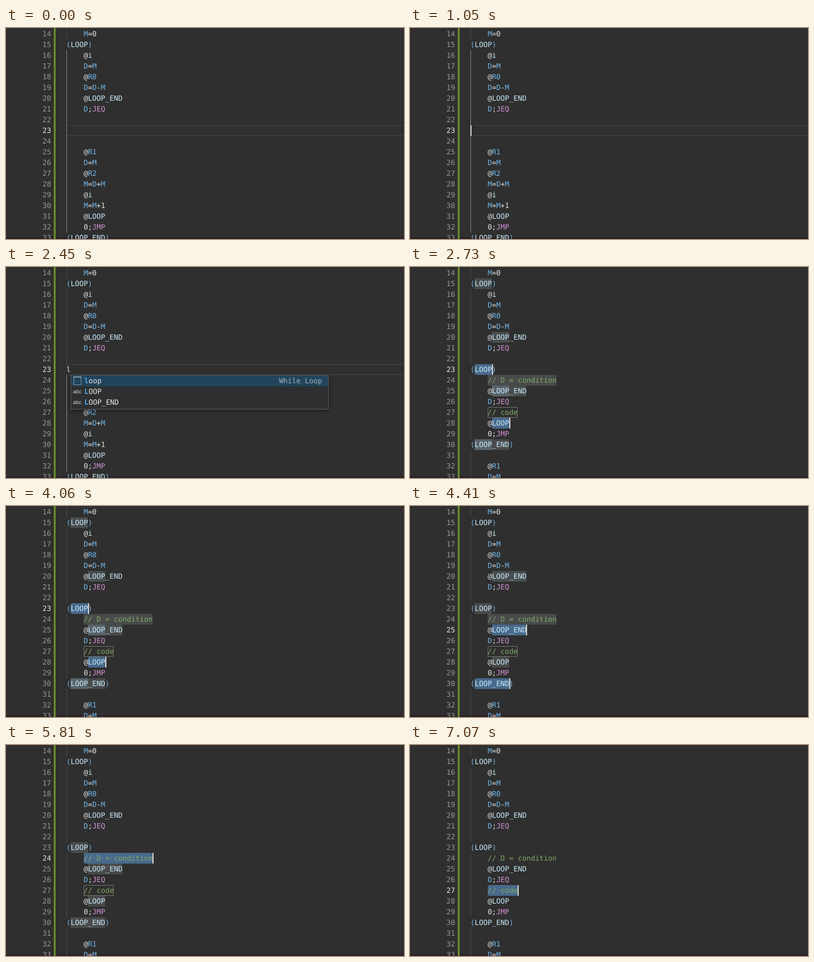
An HTML page that plays this animation: 666 by 354 pixels, repeating every 7.14 s.

```html
<!DOCTYPE html>
<html lang="en">
<head>
<meta charset="utf-8">
<title>Assembly loop snippet</title>
<style>
  html, body { margin: 0; width: 100%; height: 100%; overflow: hidden; background: #2f2f2f; }
  #stage {
    position: absolute; left: 0; top: 0; width: 666px; height: 354px; overflow: hidden;
    background: #2f2f2f; color: #e6e6e6;
    font: 12px/18px "DejaVu Sans Mono", "Liberation Mono", monospace;
    text-rendering: geometricPrecision; font-variant-ligatures: none;
  }
  #stage div { position: absolute; white-space: pre; box-sizing: border-box; }
  .foot { left: 0; top: 351px; width: 666px; height: 3px; background: #2b2128; }
  .bar { left: 80px; top: 0; width: 3px; height: 354px; background: #688f2b; }
  .num { left: 40px; width: 35.4px; text-align: right; color: #969696; }
  .num.now { color: #e8e8e8; }
  .row { left: 101px; width: 580px; height: 18px; border: 1px solid #434343; border-width: 1px 0; }
  .guide { left: 101px; width: 1px; background: #4a4a4a; }
  .guide.active { background: #858585; }
  .code { left: 101px; }
  .word { background: #484d4e; }
  .stop { background: #494b4b; }
  .hit { background: #59636b; }
  .sel { background: #486a8c; border-radius: 3px; }
  .end { border: 1px solid #6c706c; }
  .caret { width: 2px; height: 18px; background: #cfcfcf; }
  .reg { color: #70b8ec; }
  .label { color: #c9ebfb; }
  .jump { color: #d191d3; }
  .note { color: #7faa64; }
  .dot { color: #7d8d94; }
  .menu {
    left: 108px; top: 181px; width: 432px; height: 58px;
    background: #2e2f30; border: 1px solid #565656; box-shadow: 0 2px 8px rgba(0, 0, 0, .4);
  }
  .menu .pick { left: 0; top: 0; width: 430px; height: 18px; background: #21445c; }
  .menu .name { left: 22px; }
  .menu .name b { color: #4aa5e8; }
  .menu .hint { right: 10px; top: 0; color: #a3b0b8; }
  .menu .abc { left: 3px; color: #d0d0d0; font: 9px/18px "Liberation Sans", Arial, sans-serif; }
  .menu .icon { left: 4px; top: 2px; width: 13px; height: 14px; border: 1px dotted #d8d8d8; border-top-style: solid; }
</style>
</head>
<body>
<div id="stage"></div>
<script>
const LOOP_MS = 7140, BLINK = 490, FIRST = 14, ROW = 18, CHAR = 7.224, LEFT = 101;
const stage = document.getElementById("stage");

const head = ["    M=0", "(LOOP)", "    @i", "    D=M", "    @R0", "    D=D-M", "    @LOOP_END", "    D;JEQ", ""];
const tail = ["", "    @R1", "    D=M", "    @R2", "    M=D+M", "    @i", "    M=M+1", "    @LOOP", "    0;JMP", "(LOOP_END)"];
const snippet = ["(LOOP)", "    // D = condition", "    @LOOP_END", "    D;JEQ", "    // code", "    @LOOP", "    0;JMP", "(LOOP_END)"];

const typed = text => [...head, text, ...tail];
const expanded = [...head, ...snippet, ...tail.slice(0, 3)];

// Marks: [class, line, column, length]
const endBox = ["end", 27, 4, 7];
const stopNote = ["stop", 24, 4, 16];
const stopLoop = [["stop", 23, 1, 4], ["stop", 28, 5, 4]];
const stopEnd = [["stop", 25, 5, 8], ["stop", 30, 1, 8]];
const closedGuides = [[14, 14], [16, 22], [24, 29], [31, 33]];

const scenes = [
  { at: 0, caretFrom: 840, line: 23, row: true, code: typed(""), carets: [[23, 0]],
    guides: [[14, 14], [16, 32, true]], marks: [] },
  { at: 1960, line: 23, row: true, menuFrom: 2030, code: typed("l"), carets: [[23, 1]],
    guides: [[14, 14], [16, 22], [24, 32, true]], marks: [] },
  { at: 2660, line: 23, code: expanded, carets: [[23, 5], [28, 9]], guides: closedGuides,
    marks: [stopNote, ...stopEnd, endBox, ["word", 15, 1, 4], ["word", 20, 5, 4],
      ["hit", 25, 5, 4], ["hit", 30, 1, 4], ["sel", 23, 1, 4], ["sel", 28, 5, 4]] },
  { at: 4270, line: 25, code: expanded, carets: [[25, 13], [30, 9]], guides: closedGuides,
    marks: [stopNote, ...stopLoop, endBox, ["word", 20, 5, 8], ["sel", 25, 5, 8], ["sel", 30, 1, 8]] },
  { at: 5530, line: 24, code: expanded, carets: [[24, 20]], guides: closedGuides,
    marks: [...stopLoop, ...stopEnd, endBox, ["sel", 24, 4, 16]] },
  { at: 6090, line: 27, code: expanded, carets: [[27, 11]], guides: closedGuides,
    marks: [["sel", 27, 4, 7]] }
];

const rowY = line => 1 + (line - FIRST) * ROW;
const colX = col => LEFT + col * CHAR;
const box = (cls, style, body = "") => `<div class="${cls}" style="${style}">${body}</div>`;
const span = (cls, text) => `<span class="${cls}">${text}</span>`;

function paint(text, dotted) {
  return text.replace(/(\/\/.*)|(LOOP\w*|\bi\b)|(JEQ|JMP)|(\bR\d|[DM()])/g, (all, note, label, jump) => {
    if (note) return span("note", dotted ? all.replace(/ /g, span("dot", "·")) : all);
    return span(label ? "label" : jump ? "jump" : "reg", all);
  });
}

function menu() {
  const name = (word, i) => box("name", `top:${i * ROW}px`, `<b>${word[0]}</b>${word.slice(1)}`) +
    (i ? box("abc", `top:${i * ROW}px`, "abc") : "");
  return box("menu", "", box("pick", "") + box("icon", "") +
    ["loop", "LOOP", "LOOP_END"].map(name).join("") + box("hint", "", "While Loop"));
}

function draw(scene, caretOn, menuOn) {
  let html = box("foot", "") + box("bar", "");
  if (scene.row) html += box("row", `top:${rowY(scene.line)}px`);
  for (const [from, to, active] of scene.guides)
    html += box(active ? "guide active" : "guide", `top:${rowY(from)}px;height:${(to - from + 1) * ROW}px`);
  for (const [cls, line, col, len] of scene.marks)
    html += box(cls, `left:${colX(col)}px;top:${rowY(line)}px;width:${len * CHAR}px;height:${ROW}px`);
  scene.code.slice(0, 20).forEach((text, i) => {
    const line = FIRST + i, top = `top:${rowY(line)}px`;
    const dotted = scene.marks.some(m => m[0] === "sel" && m[1] === line);
    html += box(line === scene.line ? "num now" : "num", top, line) + box("code", top, paint(text, dotted));
  });
  if (menuOn) html += menu();
  if (caretOn) for (const [line, col] of scene.carets)
    html += box("caret", `left:${Math.floor(colX(col))}px;top:${rowY(line)}px`);
  stage.innerHTML = html;
}

let shown = "";
const start = performance.now();
function tick() {
  const t = (performance.now() - start) % LOOP_MS;
  const index = scenes.findLastIndex(s => s.at <= t);
  const scene = scenes[index];
  const age = t - (scene.caretFrom ?? scene.at);
  const caretOn = age >= 0 && Math.floor(age / BLINK) % 2 === 0;
  const menuOn = t >= (scene.menuFrom ?? Infinity);
  const key = [index, caretOn, menuOn].join();
  if (key !== shown) draw(scene, caretOn, menuOn);
  shown = key;
  requestAnimationFrame(tick);
}
tick();
</script>
</body>
</html>
```
